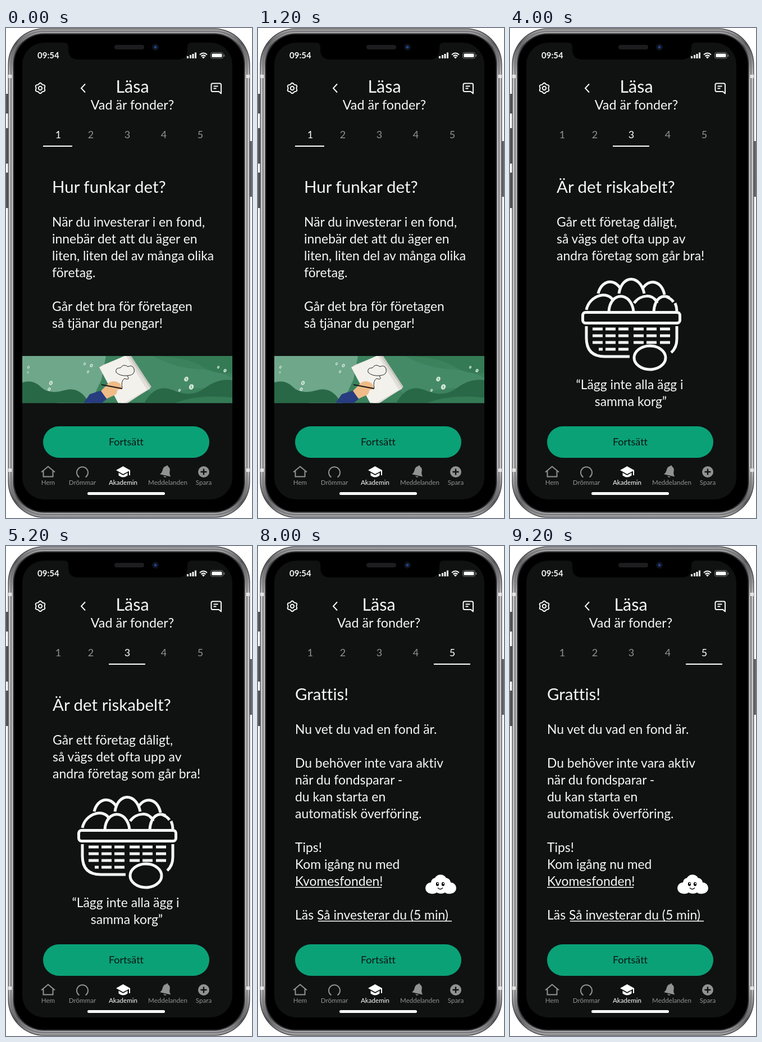
Write an HTML page that moves like this. It is 438x871 px and loops after 10000 ms.

```html
<!DOCTYPE html>
<html lang="sv">
<head>
<meta charset="utf-8">
<title>Vad är fonder?</title>
<style>
html, body { margin: 0; width: 100%; height: 100%; overflow: hidden; background: #fff; }
svg { display: block; width: 438px; height: 871px; }
text { font-family: Lato, sans-serif; font-variant-ligatures: none; fill: #f6f7f6; }
.label { font-family: Roboto, sans-serif; }
.mid { text-anchor: middle; }
.line { fill: none; stroke: #f6f7f6; stroke-width: 2; }
.dim { stroke: #919392; }
</style>
</head>
<body>
<svg viewBox="0 0 438 871">
  <defs>
    <clipPath id="banner"><rect x="29" y="583" width="374" height="83.5"/></clipPath>
    <clipPath id="lens"><circle cx="226" cy="558.500" r="32"/></clipPath>
    <linearGradient id="steel">
      <stop offset="0" stop-color="#555"/><stop offset=".5" stop-color="#bbb"/><stop offset="1" stop-color="#666"/>
    </linearGradient>
    <linearGradient id="rim" x2="0" y2="1">
      <stop offset="0" stop-color="#a6a6a8"/><stop offset=".03" stop-color="#565658"/><stop offset=".1" stop-color="#c4c4c6"/>
      <stop offset=".9" stop-color="#c4c4c6"/><stop offset=".97" stop-color="#565658"/><stop offset="1" stop-color="#a6a6a8"/>
    </linearGradient>
  </defs>

  <g id="phone">
    <path fill="url(#steel)" d="M0 117h5v35h-5zM0 178h5v63h-5zM0 257h5v63h-5zM433 201h5v99h-5z"/>
  </g>
  <rect x="29" y="26" width="374" height="812" rx="39" fill="#0f1211"/>
  <path d="M103 26Q111 26 111 34V38Q111 56 129 56H305Q323 56 323 38V34Q323 26 331 26Z"/>
  <rect x="193" y="30" width="53" height="8" rx="4" fill="#1d1d1f"/>
  <circle cx="266" cy="34" r="6" fill="#10131d"/>
  <circle cx="266" cy="34" r="2.500" fill="#1d4387"/>

  <g id="page">
    <!-- status bar -->
    <text x="56" y="54" font-size="15" font-weight="700">09:54</text>
    <path fill="#fff" d="M322 50h3v4h-3zM327 48h3v6h-3zM331.500 46h3v8h-3zM336 43.500h3v10.500h-3z"/>
    <g class="line">
      <path d="M345 47.500Q351.500 41.500 358 47.500M347.500 50.200Q351.500 46.500 355.500 50.200"/>
      <path fill="#fff" stroke="none" d="M349 52Q351.500 49.700 354 52L351.500 54.500Z"/>
      <rect x="364.500" y="43.500" width="22" height="10.500" rx="3" stroke="#777" stroke-width="1"/>
      <rect x="366.500" y="45.500" width="18" height="6.500" rx="1.500" fill="#fff" stroke="none"/>
      <path stroke="#777" stroke-width="1.500" d="M388.500 47v4"/>
    </g>

    <!-- header -->
    <path id="gear" class="line" stroke-linejoin="round"/>
    <circle class="line" cx="61" cy="107" r="3.200"/>
    <path class="line" stroke-width="2.400" d="M141 99.500L134 107L141 114.500"/>
    <path class="line" stroke-linejoin="round" d="M368 98.500H380.500Q383 98.500 383 101V116.500L379 113H368Q365.500 113 365.500 110.500V101Q365.500 98.500 368 98.500ZM369.500 103.500h8M369.500 107.500h5"/>
    <g id="title" class="mid">
      <text x="225" y="115" font-size="30.500">Läsa</text>
      <text x="225" y="145" font-size="23.300">Vad är fonder?</text>
    </g>
    <g id="tabs" class="mid" font-size="18"></g>
    <rect id="mark" y="209" height="2" fill="#fff"/>

    <!-- bottom -->
    <rect x="66" y="708" width="296" height="56" rx="28" fill="#0aa177"/>
    <text class="mid" x="214" y="742" font-size="18" style="fill:#0b1412">Fortsätt</text>
    <g class="line dim">
      <path d="M63 789.500L75 779.500L87 789.500M66.500 787.500V797.500H83.500V787.500"/>
      <path d="M130.500 798.500A10 10 0 1 1 141.500 798.500"/>
    </g>
    <path fill="#fff" d="M196 786L208.500 779L221 786V795H219V787.500L208.500 793ZM200.500 790.500L208.500 795L216.500 790.500V795.500Q208.500 801.500 200.500 795.500Z"/>
    <g transform="rotate(12 285 788)" fill="#919392">
      <path d="M285 779Q291.500 779 291.500 787Q291.500 792 295 795.500H275.500Q278.500 792 278.500 787Q278.500 779 285 779Z"/>
      <circle cx="285" cy="779" r="1.700"/><path d="M282 797h6q-3 4-6 0z"/>
    </g>
    <circle cx="352" cy="789" r="10" fill="#919392"/>
    <path stroke="#0f1211" stroke-width="2.400" d="M346.500 789h11M352 783.500v11"/>
    <g id="nav" class="mid" font-size="11.600"></g>
    <rect x="145" y="825" width="138" height="5" rx="2.500" fill="#fff"/>

    <!-- 1: how it works -->
    <g class="screen">
      <g clip-path="url(#banner)">
        <path fill="#3c825d" d="M29 583h374v84H29z"/>
        <path fill="#6fa78b" d="M29 583H178L170 625L150 667H92Q70 645 29 636Z"/>
        <path fill="#296846" d="M29 630Q48 624 62 638T104 644T148 667H29Z"/>
        <path fill="#458a67" d="M222 583H262Q300 604 338 606T403 622V640Q340 636 300 648T250 640Z"/>
        <path fill="#347a55" d="M274 583H403V613Q372 617 350 602T274 583Z"/>
        <path fill="#296846" d="M246 667Q266 630 298 644T354 640T403 626V667Z"/>
        <path fill="#347a55" d="M300 667Q342 650 403 657V667Z"/>
        <g id="coins" fill="#d5e8dc"></g>
        <path fill="#c9c6bf" d="M172 599L221 580L259 638L212 670Z"/>
        <path fill="#e0ded8" d="M169 601L217 581L257 641L208 671Z"/>
        <path fill="#f3f1ec" d="M166 603L213 582L251 643L202 671Z"/>
        <path fill="none" stroke="#25282a" d="M207 640Q204 628 211 623Q222 627 216 618Q231 617 228 606Q225 598 217 602Q209 596 204 604Q194 604 196 612Q203 619 216 618"/>
        <path fill="#283c80" d="M138 667L149 651L170 644L180 659L170 667Z"/>
        <path fill="#efbb86" d="M169 645L184 630Q193 625 203 632L207 641L198 644Q198 652 190 654L179 659Z"/>
        <path stroke="#17191b" stroke-width="2" d="M170 634L207 641"/>
      </g>
    </g>

    <!-- 2: time -->
    <g class="screen">
      <g transform="translate(0 -2)" fill="none">
        <path fill="#fff" d="M29 477h374v189H29z"/>
        <g id="grid" stroke="#e6e4d9"></g>
        <path stroke="#20bf73" stroke-width="1.300" d="M42 632L52 625L54 604L60 617L67 588L71 600L82 589L91 602L97 592L102 598L108 585L112 600L115 554L123 571L126 556L137 557L143 537L150 553L155 542L163 551L177 543L188 546L197 530L206 538M258 570L262 579L269 561L279 582L284 568L291 569L293 557L301 543L306 551L318 528L325 540L333 532L339 546L346 521L354 526L357 507H371L379 514L393 495M385 497L393 494V502"/>
        <circle cx="226" cy="558.500" r="33" fill="#fff"/>
        <g clip-path="url(#lens)">
          <path stroke="#dedac7" stroke-width="1.500" d="M190 530h72M190 552h72M190 574h72"/>
          <path stroke="#ff729d" stroke-width="2.600" d="M201 534L219 549L221 566L240 571L254 582"/>
        </g>
        <path fill="#ef4775" d="M218 541h6l-3 4.500zM237.500 561h6l-3 4.500z"/>
        <circle cx="226" cy="558.500" r="32.500" stroke="#000" stroke-width="4"/>
        <path stroke="#000" stroke-width="4" d="M203 581l-5 5"/>
        <path stroke="#000" stroke-width="8" stroke-linecap="round" d="M200 584L179 603"/>
        <path stroke="#ff7da6" stroke-width="1.300" d="M193.500 513v5M193.500 515.500H259.500M259.500 513v5M42.500 643v6M42.500 646H396M389 641.500L396 646L389 650.500"/>
        <g class="mid" font-size="8" font-weight="700">
          <text x="227" y="512" style="fill:#111">1 år</text>
          <text x="227" y="658" style="fill:#111">10 år</text>
        </g>
      </g>
    </g>

    <!-- 3: risk -->
    <g class="screen">
      <g class="line" style="stroke-width:5">
        <path d="M194 472C199 438 232 438 239 472M157 472C163 448 186 444 197 464M237 462C248 445 270 449 275 474M279 478Q287 481 291 487"/>
        <path d="M136 501C141 475 175 466 184 485M176 504C178 468 216 468 220 504M221 489C232 473 256 472 262 489M256 504C258 478 272 474 284 479M294 489Q297 496 297 503"/>
        <rect x="129.500" y="505.500" width="173" height="19" rx="5"/>
        <path d="M136 530V551Q136 584 169 584H213M297 530V553Q297 568 287 577"/>
        <ellipse cx="249" cy="586" rx="28" ry="21"/>
        <g id="weave"></g>
      </g>
    </g>

    <!-- 4: earnings -->
    <g class="screen">
      <g class="line" transform="translate(0 -2)" style="stroke-width:1.200" stroke-linejoin="round">
        <path stroke="#d0d2d1" d="M82 656V502M78 506L82 501.500L86 506M82 656H338M334 652L338.500 656L334 660"/>
        <path style="stroke:#0aa177;stroke-width:2" d="M82 655C168 617 240 590 303 536"/>
        <path style="stroke:#a8aaa9;stroke-width:2" d="M82 655C150 636 230 607 306 588"/>
        <g transform="translate(314 525) rotate(45)" fill="#0f1211">
          <path d="M-4 -5L-17 4V8L-4 5ZM4 -5L17 4V8L4 5ZM-3 12L-9 18V20L0 18L9 20V18L3 12Z"/>
          <path d="M0 -20Q5 -16 5 -8V4Q4 14 0 19Q-4 14 -5 4V-8Q-5 -16 0 -20Z"/>
          <path d="M-4 -11Q0 -15 4 -11M-2 -5h4v3h-4zM-2 1h4v3h-4zM0 9v7M-10 1v4M10 1v4"/>
        </g>
        <path fill="#0f1211" d="M332 578L299 584L306 588L304 594L311 590L319 593ZM332 578L306 588M332 578L311 590"/>
        <g stroke="none">
          <text class="label" x="71" y="495" font-size="12">SEK</text>
          <text class="label" x="344" y="660" font-size="12">År</text>
          <text class="label mid" x="319" y="501" font-size="13.800">Fonder</text>
          <text class="label mid" x="322" y="571" font-size="13.800">Sparpengar</text>
        </g>
      </g>
    </g>

    <!-- 5: done -->
    <g class="screen">
      <path fill="#fff" d="M66 606h154v1.500H66zM107 666h238v1.500H107z"/>
      <path fill="#fff" d="M308 618A10 10 0 0 1 308 598A9 9 0 0 1 315 590A11.500 11.500 0 0 1 335 590A9 9 0 0 1 343 598A10 10 0 0 1 343 618Q336 619 333 616Q326 620 318 616Q314 619 308 618Z"/>
      <ellipse cx="319.500" cy="601" rx="2.600" ry="3.400"/>
      <ellipse cx="329.500" cy="601" rx="2.600" ry="3.400"/>
      <path fill="#fff" d="M319 599h2v2h-2zM329 599h2v2h-2z"/>
      <path fill="none" stroke="#111" stroke-width="1.300" d="M320 607.500Q324.500 612.500 329 607.500"/>
    </g>
  </g>
</svg>
<script>
const $ = id => document.getElementById(id);
const add = (el, markup) => el.insertAdjacentHTML('beforeend', markup);
const screens = [...document.querySelectorAll('.screen')];
const grey = '#919392', white = '#fff';

// Phone shell: nested rounded rectangles as [inset, fill]
for (const [d, c] of [[0, '#3c3c3e'], [1.2, 'url(#rim)'], [4.5, '#77777a'], [6.5, 'url(#rim)'], [9, '#2c2c2e'], [11, '#000']])
  add($('phone'), `<rect x="${3.5 + d}" y="${.5 + d}" width="${431 - 2 * d}" height="${870 - 2 * d}" rx="${64 - d}" fill="${c}"/>`);
for (const x of [4, 428]) for (const y of [83, 783])
  add($('phone'), `<rect x="${x}" y="${y}" width="6" height="6" fill="#e4e4e4"/>`);

const gear = Array.from({length: 72}, (_, i) => {
  const a = i * Math.PI / 36, r = 8.3 + .9 * Math.cos(6 * a + Math.PI);
  return `${61 + r * Math.cos(a)} ${107 + r * Math.sin(a)}`;
});
$('gear').setAttribute('d', `M${gear.join('L')}Z`);

const tabX = [93, 151, 216, 281, 346];
tabX.forEach((x, i) => add($('tabs'), `<text x="${x}" y="196">${i + 1}</text>`));
[['Hem', 75], ['Drömmar', 136], ['Akademin', 208.5], ['Meddelanden', 288], ['Spara', 352]].forEach(([name, x], i) =>
  add($('nav'), `<text x="${x}" y="812" style="fill:${i == 2 ? white : grey}">${name}</text>`));

for (const [x, y, r] of [[40, 603, 2], [39, 612, 1.5], [80, 631, 3], [77, 642, 2.5], [140, 597, 2], [152, 600, 2.5], [146, 611, 2],
                         [321, 624, 3.5], [330, 638, 4], [309, 644, 2], [378, 603, 2], [390, 609, 2.5]])
  add($('coins'), `<ellipse cx="${x}" cy="${y}" rx="${r}" ry="${r * 1.25}" transform="rotate(25 ${x} ${y})"/>
    <path d="M${x} ${y - r * .6}v${r * 1.2}" stroke="#3c825d"/>`);

for (let y = 489.5; y < 640; y += 12) add($('grid'), `<path d="M42 ${y}H391"/>`);

[535, 547, 559, 571].forEach((y, row) => [147, 170, 193, 220, 243, 267].forEach((x, col) => {
  if (row == 3 && col > 2) return;
  const cut = row == 3 && col == 0 ? 11 : 0;
  add($('weave'), `<path d="M${x + cut} ${y}h${18 - cut}"/>`);
}));

// Text blocks: x, heading baseline, first body baseline, heading, lines 30 px apart
const copy = [
  [82, 293, 353, 'Hur funkar det?', ['När du investerar i en fond,', 'innebär det att du äger en', 'liten, liten del av många olika',
    'företag.', '', 'Går det bra för företagen', 'så tjänar du pengar!']],
  [82, 293, 353, 'Tid?', ['Över tid går det mer eller', 'mindre bra för företagen,', 'men historiskt går det alltid', 'mer upp än ner.']],
  [83, 293, 353, 'Är det riskabelt?', ['Går ett företag dåligt,', 'så vägs det ofta upp av', 'andra företag som går bra!']],
  [83, 293, 353, 'Vad tjänar jag?', ['I grafen kan du se hur det', 'skiljer sig att spara i fonder,', 'jämfört med ett sparkonto!']],
  [66, 274, 334, 'Grattis!', ['Nu vet du vad en fond är.', '', 'Du behöver inte vara aktiv', 'när du fondsparar -', 'du kan starta en',
    'automatisk överföring.', '', 'Tips!', 'Kom igång nu med', 'Kvomesfonden!', '', 'Läs Så investerar du (5 min)']]
];
const bodySize = 22.9;
const write = (el, x, y, size, s, cls = '') => add(el, `<text class="${cls}" x="${x}" y="${y}" font-size="${size}">${s}</text>`);
copy.forEach(([x, top, first, head, lines], i) => {
  write(screens[i], x, top, 29.5, head);
  lines.forEach((s, n) => s && write(screens[i], x, first + 30 * n, bodySize, s));
});
write(screens[2], 213, 642, bodySize, '“Lägg inte alla ägg i', 'mid');
write(screens[2], 215, 672, bodySize, 'samma korg”', 'mid');

let shown = -1;
function show(n) {
  shown = n;
  screens.forEach((s, i) => s.style.display = i == n ? '' : 'none');
  [...$('tabs').children].forEach((t, i) => t.style.fill = i == n ? white : grey);
  const left = n ? 53 + 65 * n : 66;
  $('mark').setAttribute('x', left);
  $('mark').setAttribute('width', n ? 65 : 52);
  $('page').setAttribute('transform', `translate(0 ${n % 2 * 2})`);
  $('title').setAttribute('transform', `translate(${n == 4 ? -10 : 0} 0)`);
}
function tick() {
  const n = Math.floor(performance.now() % 10000 / 2000);
  if (n != shown) show(n);
  requestAnimationFrame(tick);
}
tick();
</script>
</body>
</html>
```
